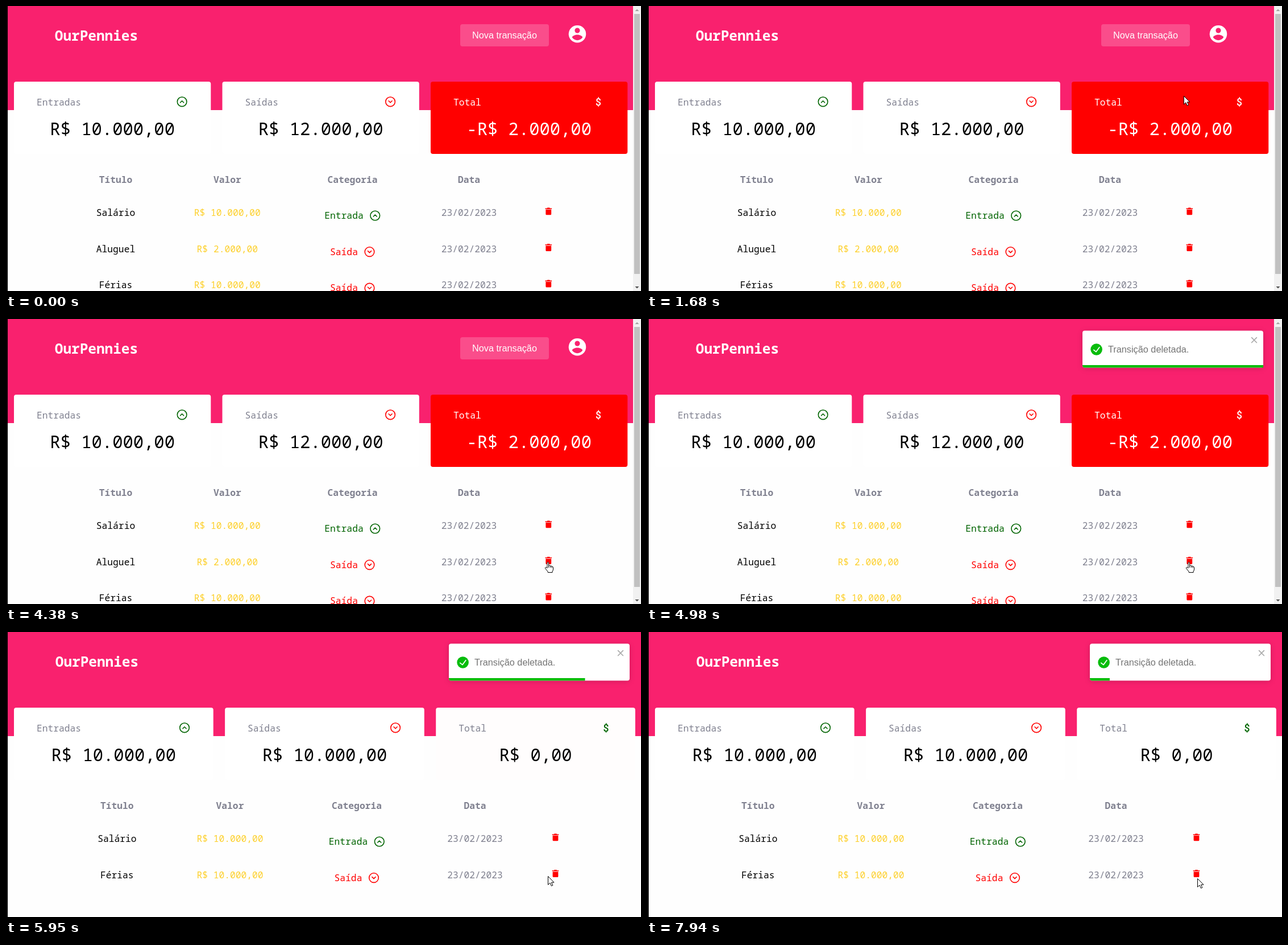
Write an HTML page that moves like this. It is 1117 px wide and 501 px high and loops after 8 s.

```html
<!DOCTYPE html>
<html lang="pt-BR">
<head>
<meta charset="utf-8">
<title>OurPennies</title>
<style>
  html, body { margin: 0; width: 100%; height: 100%; overflow: hidden; background: #fefefe; }
  svg { display: block; width: 1117px; height: 501px; }
  text { font: 16.27px "Noto Sans Mono", "DejaVu Sans Mono", monospace; white-space: pre; }
  .brand { font-size: 24.4px; font-weight: 700; }
  .amount { font-size: 30.5px; font-weight: 500; }
  .head { font-weight: 700; }
  .sans { font-family: "Liberation Sans", Arial, sans-serif; }
  .dollar { font: 500 17.5px Roboto, sans-serif; }
  .toast { filter: drop-shadow(0 1px 5px rgba(0,0,0,.12)) drop-shadow(0 2px 6px rgba(0,0,0,.05)); }
</style>
</head>
<body>
<svg id="stage" viewBox="0 0 1117 501"></svg>
<script>
const LOOP = 8000, DELETED = 5776, TOAST = 4485, TOAST_TIME = 760;
const BAR_START = 5188, BAR_TIME = 3093, TOAST_W = 318;
const PINK = '#f9216e', GRAY = '#7f808f', GREEN = '#006400', RED = '#ff0000', YELLOW = '#fdd02c', OK = '#07bc0c';
const stage = document.getElementById('stage');

// cursor hotspot: time, x, y
const cursorPath = [
  [70, 1112, 472], [450, 1104, 210], [640, 1083, 145], [850, 1047, 76], [930, 1040, 57],
  [1330, 1040, 57], [1400, 1032, 53], [1680, 944, 157], [1900, 910, 300], [2130, 946, 420],
  [2200, 953, 420], [2350, 953, 420], [2490, 953, 427], [5810, 953, 427], [5950, 953, 429],
  [7200, 953, 429], [7940, 968, 433]
];
// toast offset: part of its entrance, x
const bouncePath = [[0, 3000], [.6, -25], [.75, 10], [.9, -5], [1, 0]];

const clamp = v => Math.max(0, Math.min(1, v));
const lerp = (a, b, k) => a + (b - a) * k;

function bezier(x1, y1, x2, y2) {
  const at = (a, b, s) => 3 * a * s * (1 - s) ** 2 + 3 * b * s * s * (1 - s) + s ** 3;
  return x => {
    let lo = 0, hi = 1;
    for (let i = 0; i < 24; i++) {
      const mid = (lo + hi) / 2;
      if (at(x1, x2, mid) < x) lo = mid; else hi = mid;
    }
    return at(y1, y2, lo);
  };
}
const ease = bezier(.25, .1, .25, 1);
const bounceEase = bezier(.215, .61, .355, 1);

function follow(path, t, easing = k => k) {
  const last = path[path.length - 1];
  if (t >= last[0]) return last.slice(1);
  const i = Math.max(1, path.findIndex(p => p[0] > t));
  const a = path[i - 1], b = path[i];
  const k = easing(clamp((t - a[0]) / (b[0] - a[0])));
  return a.slice(1).map((v, n) => lerp(v, b[n + 1], k));
}

const text = (s, x, y, fill, cls = '', anchor = 'start') =>
  `<text x="${x}" y="${y}" fill="${fill}" class="${cls}" text-anchor="${anchor}">${s}</text>`;
const centered = (s, x, y, fill, cls) => text(s, x, y, fill, cls, 'middle');
const rect = (x, y, w, h, fill, r = 0) =>
  `<rect x="${x}" y="${y}" width="${w}" height="${h}" rx="${r}" fill="${fill}"/>`;
const line = (d, color, width) =>
  `<path d="${d}" fill="none" stroke="${color}" stroke-width="${width}" stroke-linecap="round" stroke-linejoin="round"/>`;
const place = (x, y, body) => `<g transform="translate(${x} ${y})">${body}</g>`;

const chevron = (x, y, up, color) => place(x, y,
  `<circle r="8.3" fill="none" stroke="${color}" stroke-width="1.6"/>` +
  line(up ? 'M-3 1.5 0-1.5 3 1.5' : 'M-3-1.5 0 1.5 3-1.5', color, 1.6));

const trash = (x, y) => place(x, y,
  `<path fill="${RED}" d="M-5.8-5.6h3l1-1h3.6l1 1h3v1.6H-5.8zM-4.9-3.2H4.9V4.8q0 1.5-1.5 1.5H-3.4q-1.5 0-1.5-1.5z"/>`);

const avatar = `<g transform="translate(986.7 30.9) scale(1.525)"><circle cx="12" cy="12" r="10" fill="#fff"/>
  <circle cx="12" cy="8" r="3" fill="${PINK}"/>
  <path fill="${PINK}" d="M12 19.2c-2.5 0-4.71-1.28-6-3.22.03-1.99 4-3.08 6-3.08s5.97 1.09 6 3.08c-1.29 1.94-3.5 3.22-6 3.22z"/></g>`;

function card(x, w, label, amount, icon, bg = '#fff', labelColor = GRAY, color = '#000') {
  return rect(x, 133, w, 127, bg, 4) + text(label, x + 40, 175, labelColor) +
    centered(amount, x + w / 2, 227, color, 'amount') + icon(x + w - 50.7);
}

function row(y, cols, title, value, income) {
  const color = income ? GREEN : RED, kind = income ? 'Entrada' : 'Saída';
  const w = kind.length * 9.76, left = cols[2] - (w + 30) / 2;
  return centered(title, cols[0], y, '#000') + centered(value, cols[1], y, YELLOW) +
    text(kind, left, y + 5, color) + chevron(left + w + 20.6, y - .5, income, color) +
    centered('23/02/2023', cols[3], y, GRAY) + trash(cols[4], y - 8);
}

function scrollbar(hover) {
  return rect(1103, 0, 14, 501, '#f1f1f1') + rect(1105, 14, 10, 457, hover ? '#a8a8a8' : '#c1c1c1') +
    '<path fill="#a3a3a3" d="M1106.5 9 1110 5.5 1113.5 9z"/><path fill="#505050" d="M1106.5 493 1110 496.5 1113.5 493z"/>';
}

function page(t, hover) {
  const done = t >= DELETED, k = ease(clamp((t - DELETED) / 200));
  const w = done ? 350.7 : 346.3, step = done ? 371.1 : 366.5;
  const cols = done ? [195.3, 394, 617, 825, 966.5] : [193, 389.3, 609.5, 814.5, 954.3];
  const fade = Math.round(255 * k), ink = 255 - fade;
  let out = rect(0, 0, 1117, 501, '#fefefe') + rect(0, 0, 1117, 183, PINK) +
    text('OurPennies', done ? 86.8 : 85.8, 61, '#fff', 'brand');
  if (!done) {
    out += rect(799, 32, 156, 39, 'rgba(255,255,255,.2)', 4) +
      centered('Nova transação', 877, 57, '#fff', 'sans') + avatar;
  }
  out += card(14, w, 'Entradas', 'R$ 10.000,00', x => chevron(x, 168.3, true, GREEN)) +
    card(14 + step, w, 'Saídas', done ? 'R$ 10.000,00' : 'R$ 12.000,00', x => chevron(x, 168.3, false, RED)) +
    card(14 + 2 * step, w, 'Total', done ? 'R$ 0,00' : '-R$ 2.000,00',
      x => centered('$', x - .7, 174.5, done ? GREEN : '#fff', 'dollar'),
      `rgb(255,${fade},${fade})`, done ? GRAY : '#fff', `rgb(${ink},${ink},${ink})`);
  ['Título', 'Valor', 'Categoria', 'Data'].forEach((s, i) => out += centered(s, cols[i], 310.5, GRAY, 'head'));
  const rows = [['Salário', 'R$ 10.000,00', true], ['Aluguel', 'R$ 2.000,00', false], ['Férias', 'R$ 10.000,00', false]];
  if (done) rows.splice(1, 1);
  rows.forEach((r, i) => out += row(369 + 63.6 * i, cols, ...r));
  return out + rect(0, 0, 3, 501, '#000') + (done ? '' : scrollbar(hover));
}

function toast(t) {
  if (t < TOAST) return '';
  const p = (t - TOAST) / TOAST_TIME;
  const x = (t >= DELETED ? 779 : 765) + follow(bouncePath, p, bounceEase)[0];
  if (x > 1130) return '';
  const bar = TOAST_W * (1 - clamp((t - BAR_START) / BAR_TIME));
  return place(x, 20.5, `<g opacity="${bounceEase(clamp(p / .6))}">` +
    `<g class="toast">${rect(0, 0, TOAST_W, 65, '#fff', 4)}</g>` +
    `<circle cx="24.6" cy="33" r="10.3" fill="${OK}"/>` + line('M19.8 33.8 23.9 37.2 29.8 29.2', '#fff', 1.7) +
    text('Transição deletada.', 45, 38.5, '#757575', 'sans') +
    line('M297.6 12.2 306.4 21M306.4 12.2 297.6 21', '#aaa', 1.7) +
    `<path fill="${OK}" d="M0 60.5H${bar}V65H4Q0 65 0 61z"/></g>`);
}

const arrow = '<path fill="#fff" stroke="#000" d="M.5.5V15.3L4 12 6.4 17.4 8.8 16.4 6.5 11.2H11z"/>';
const hand = `<path fill="#fff" stroke="#000" stroke-linejoin="round" d="M-1 11V1.8Q-1 .5.3.5T1.6 1.8V6.4Q4 5.6 4.4 7
  6.4 6.4 6.9 8 9.5 7.8 9.5 10V13Q9.5 15 8 17V18.6H.2V17.2L-4.2 11.6Q-5.2 9.6-3.4 9.4-2.4 9.4-1 11z"/>
  <path d="M1.6 6.5V10M4.4 7.3V10M6.9 8.3V10.5" stroke="#000"/>`;

function draw(now) {
  const t = now % LOOP;
  const [x, y] = follow(cursorPath, t);
  const visible = t >= 70;
  const cursor = t >= 2200 && t < DELETED ? hand : arrow;
  stage.innerHTML = page(t, visible && x >= 1103) + toast(t) + (visible ? place(x, y, cursor) : '');
}

const start = performance.now();
function tick() {
  draw(performance.now() - start);
  requestAnimationFrame(tick);
}
tick();
</script>
</body>
</html>
```
